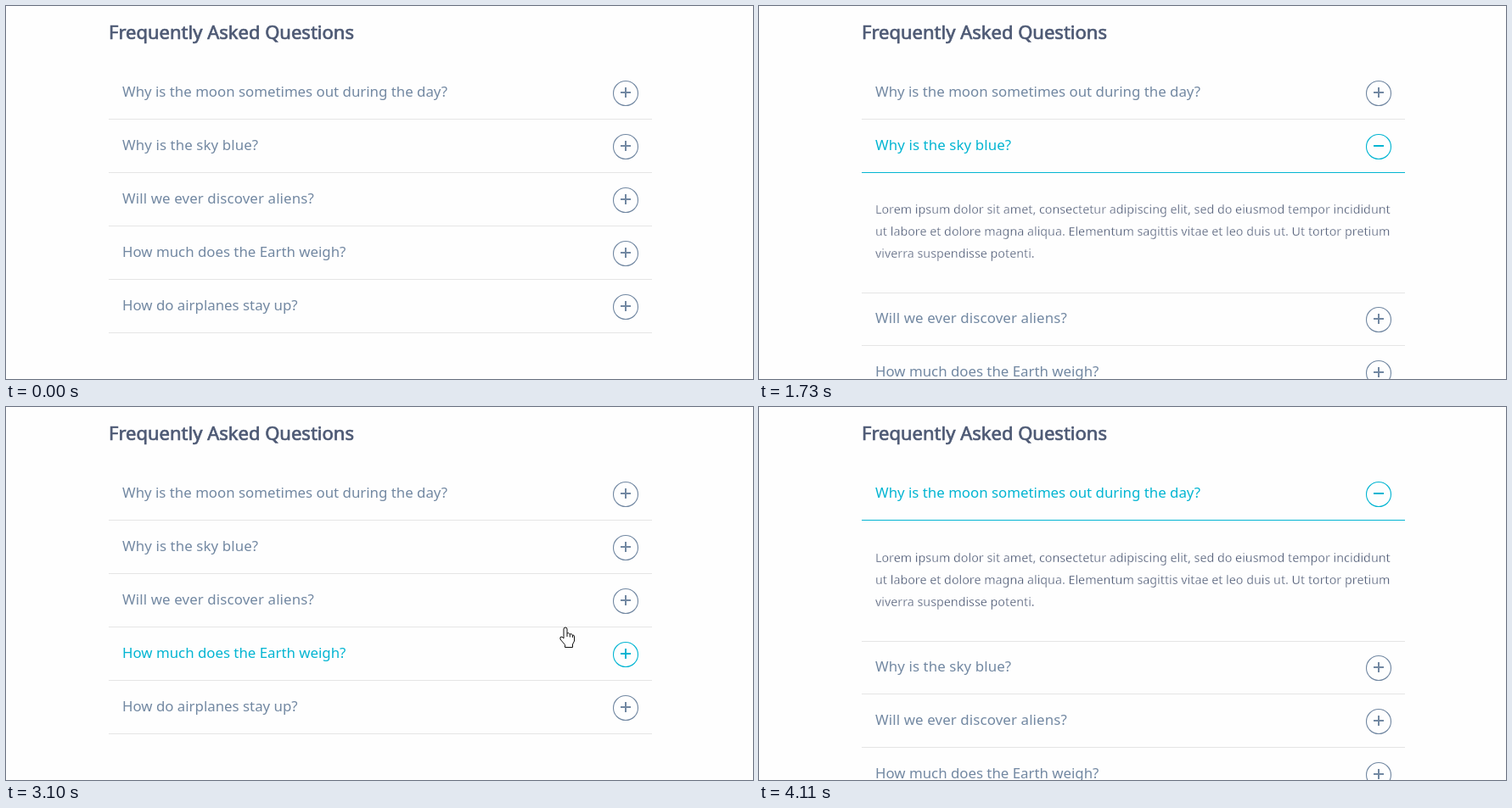
Animation, 880 px wide and 440 px high, one loop 4.95 s. Source, as an HTML page:

```html
<!DOCTYPE html>
<html lang="en">
<head>
<meta charset="utf-8">
<title>FAQ accordion</title>
<style>
html, body { margin: 0; width: 100%; height: 100%; overflow: hidden; background: #fefefe; }
svg { display: block; width: 880px; height: 440px; font-family: "Noto Sans", "Open Sans", sans-serif; }
.title { font-size: 22px; fill: #4d5974; stroke: #4d5974; stroke-width: .7px; }
.row { color: #7288a2; }
.row.on { color: #03b5d2; }
.row text { font-size: 16.84px; fill: currentColor; }
.row circle { fill: none; stroke: currentColor; stroke-width: 1.1px; }
.bar { fill: currentColor; }
/* the pale outline thins the letters to a light weight */
.panel text { font-size: 14.29px; fill: #4d5974; stroke: #fefefe; stroke-width: .3px; }
.cursor path { fill: #fff; stroke: #111; stroke-width: 1px; stroke-linejoin: round; }
</style>
</head>
<body>
<svg id="stage" viewBox="0 0 880 440">
  <text class="title" x="121" y="39">Frequently Asked Questions</text>
</svg>
<script>
const LOOP = 4950, ROW = 63, GRAY = '#e5e5e5', TEAL = '#03b5d2';
const stage = document.getElementById('stage');
const questions = [
  ['Why is the moon sometimes out during the day?', 0],
  ['Why is the sky blue?', .11],
  ['Will we ever discover aliens?', .13],
  ['How much does the Earth weigh?', 0],
  ['How do airplanes stay up?', 0]
];
const answer = [
  'Lorem ipsum dolor sit amet, consectetur adipiscing elit, sed do eiusmod tempor incididunt',
  'ut labore et dolore magna aliqua. Elementum sagittis vitae et leo duis ut. Ut tortor pretium',
  'viverra suspendisse potenti.'
];

function add(parent, tag, attrs, text) {
  const el = document.createElementNS('http://www.w3.org/2000/svg', tag);
  for (const k in attrs) el.setAttribute(k, attrs[k]);
  if (text) el.textContent = text;
  parent.appendChild(el);
  return el;
}
const rect = (parent, x, y, width, height, cls) =>
  add(parent, 'rect', { x, y, width, height, class: cls });
const show = (el, on) => el.setAttribute('display', on ? 'inline' : 'none');
const move = (el, x, y) => el.setAttribute('transform', `translate(${x} ${y})`);

const rows = questions.map(([label, gap]) => {
  const g = add(stage, 'g', { class: 'row' });
  add(g, 'text', { x: 137, y: 107, 'letter-spacing': gap }, label);
  add(g, 'circle', { cx: 730, cy: 103, r: 14.5 });
  rect(g, 724, 101, 12, 2, 'bar');
  const stem = rect(g, 729, 96, 2, 12, 'bar');
  const line = rect(g, 121, 133, 640, 1, '');
  return { g, stem, line };
});

const panel = add(stage, 'g', { class: 'panel' });
const lines = add(panel, 'g', {});
answer.forEach((s, i) => add(lines, 'text', { x: 137, y: 26 * i }, s));
const edge = rect(panel, 121, 0, 640, 1, '');
edge.setAttribute('fill', GRAY);

const cursor = add(stage, 'g', { class: 'cursor' });
const hand = add(cursor, 'g', {});
add(hand, 'path', { d: 'M-2 13V2Q-2 0 0 0T2 2V7Q4 5.5 5.3 8Q7.2 6.8 8.4 9Q10.5 8.5 10.5 11V16L8.5 20V23.5H-.5V20.5L-6 14Q-7 10.5-4 11Z' });
add(hand, 'path', { d: 'M2 7v4M5.3 8v3.5M8.4 9v3' });
const arrow = add(cursor, 'path', { d: 'M.5.5V16.5L4.2 13L6.8 19L9.3 18L6.8 12.2H11.6Z' });

const clamp = v => Math.min(1, Math.max(0, v));

// CSS "ease": cubic-bezier(.25, .1, .25, 1)
function ease(p) {
  p = clamp(p);
  let lo = 0, hi = 1, s = p;
  for (let i = 0; i < 24; i++) {
    s = (lo + hi) / 2;
    const x = .75 * s * (1 - s) + s ** 3;
    if (x < p) lo = s; else hi = s;
  }
  return .3 * s * (1 - s) ** 2 + 3 * s * s * (1 - s) + s ** 3;
}

// The text height appears at once, the padding and opacity ease in.
function panelAt(t) {
  let v = 0, item = 1, base = 110;
  if (t >= 3723) { item = 0; v = ease((t - 3723) / 350); }
  else if (t >= 2910) { base = 0; v = 1 - ease((t - 2860) / 200); }
  else if (t >= 1520) v = ease((t - 1460) / 350);
  else base = 0;
  return { item, v, full: base > 0, height: Math.round(base + 32 * v) };
}

// time, x, y of the pointer; each run is one visible stretch
const runs = [
  [[640, 545, 340], [1000, 407, 162], [1520, 407, 162]],
  [[2220, 815, 312], [2510, 522, 150], [2930, 522, 150], [3100, 659, 261],
   [3260, 654, 114], [3320, 654, 114], [3410, 636, 97], [3640, 636, 97],
   [3770, 815, 185], [3830, 884, 216]]
];

function pointerAt(t) {
  for (const run of runs) {
    for (let i = 1; i < run.length; i++) {
      const [t0, x0, y0] = run[i - 1], [t1, x1, y1] = run[i];
      if (t < t0 || t >= t1) continue;
      const p = (t - t0) / (t1 - t0), k = t < 2510 ? p * (2 - p) : p;
      return { x: Math.round(x0 + (x1 - x0) * k), y: Math.round(y0 + (y1 - y0) * k) };
    }
  }
  return null;
}

function draw(t) {
  const p = panelAt(t), ptr = pointerAt(t);
  const active = t >= 3600 ? 0 : t >= 1400 && t < 2790 ? 1 : -1;
  let hover = -1;
  rows.forEach((r, i) => {
    const y = ROW * i + (i > p.item ? p.height : 0);
    move(r.g, 0, y);
    if (ptr && ptr.x >= 121 && ptr.x < 761 && ptr.y >= 71 + y && ptr.y < 134 + y) hover = i;
  });
  rows.forEach((r, i) => {
    r.g.classList.toggle('on', i === active || i === hover);
    show(r.stem, i !== active);
    r.line.setAttribute('fill', i === active ? TEAL : GRAY);
  });

  show(panel, p.height > 0);
  panel.setAttribute('opacity', p.v);
  move(panel, 0, 134 + ROW * p.item);
  show(lines, p.full);
  move(lines, 0, Math.round(33 + 16 * p.v));
  edge.setAttribute('y', p.height);

  show(cursor, !!ptr);
  if (ptr) {
    move(cursor, ptr.x, ptr.y);
    show(hand, hover >= 0);
    show(arrow, hover < 0);
  }
}

const start = performance.now();
function tick() {
  draw((performance.now() - start) % LOOP);
  requestAnimationFrame(tick);
}
tick();
</script>
</body>
</html>
```
